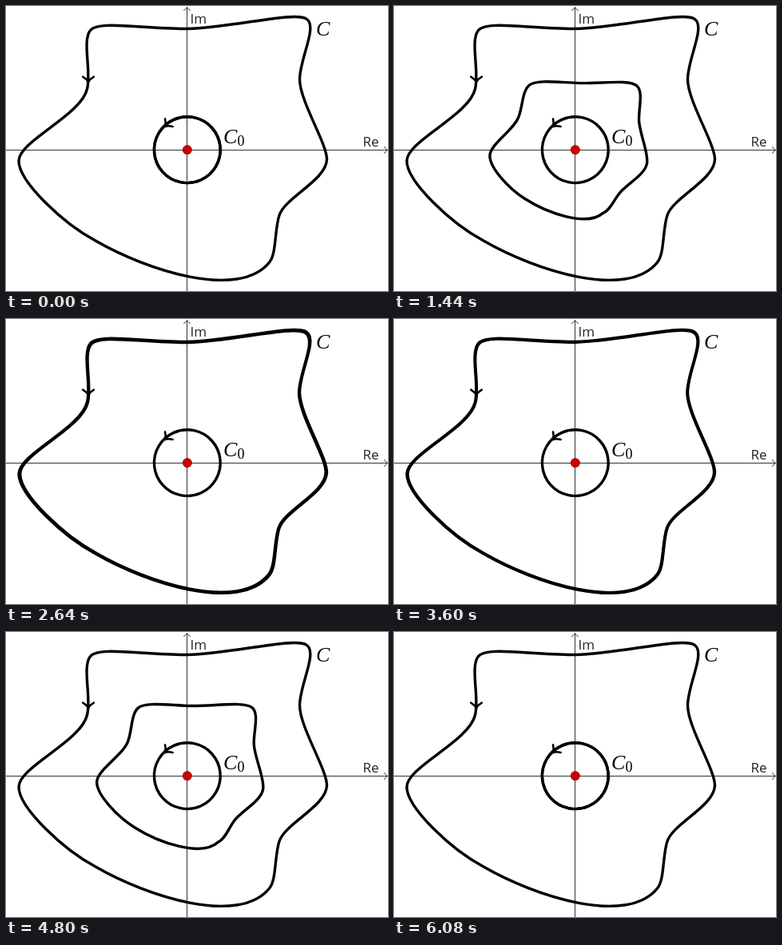
An HTML page with a canvas for the animation above (6240 ms loop, 478 px wide and 357 px high).

```html
<!DOCTYPE html>
<html lang="en">
<head>
<meta charset="utf-8">
<title>Contour deformation</title>
<style>
  html, body { margin: 0; width: 478px; height: 357px; overflow: hidden; background: #fff; }
  canvas { display: block; }
</style>
</head>
<body>
<canvas id="stage" width="478" height="357"></canvas>
<script>
const ctx = document.getElementById('stage').getContext('2d');
const W = 478, H = 357, LOOP = 6240, STEP = 80, LAG = 0.3;
const CX = 226.8, CY = 180.2, R = 41.4;

// Closed contour, counter-clockwise: anchor, then two handles towards the next anchor.
const outer = [
  [376.5, 16.5, 362, 5.8, 285, 27],
  [227, 28.5, 170, 29, 116, 17.5],
  [105.5, 30.5, 95, 43.5, 107, 82],
  [101.5, 104, 94, 137, 16, 169],
  [16, 194, 16, 220, 71, 272],
  [112, 294, 176, 331, 292, 369],
  [330, 320.5, 338.5, 309.5, 336, 280],
  [342, 262, 349.5, 239.5, 401, 218],
  [401.5, 192, 401.5, 172, 367.5, 119],
  [367.5, 92, 367.5, 66, 390, 26.5]
];

// The circle, cut into as many arcs as the contour has segments.
const rad = Math.PI / 180;
const arc = 360 / outer.length * rad;
const handle = 4 / 3 * Math.tan(arc / 4) * R;
const circle = outer.map((_, i) => {
  const a = 42 * rad + i * arc, b = a + arc;
  return [
    CX + R * Math.cos(a), CY - R * Math.sin(a),
    CX + R * Math.cos(a) - handle * Math.sin(a), CY - R * Math.sin(a) - handle * Math.cos(a),
    CX + R * Math.cos(b) + handle * Math.sin(b), CY - R * Math.sin(b) + handle * Math.cos(b)
  ];
});

const ease = u => (1 - Math.cos(Math.PI * u)) / 2;

function contour(f) {
  const segs = circle.map((s, i) => s.map((v, k) => v + (outer[i][k] - v) * f));
  ctx.beginPath();
  ctx.moveTo(segs[0][0], segs[0][1]);
  segs.forEach((s, i) => {
    const next = segs[(i + 1) % segs.length];
    ctx.bezierCurveTo(s[2], s[3], s[4], s[5], next[0], next[1]);
  });
  ctx.closePath();
  ctx.stroke();
}

function pen(color, width) {
  ctx.strokeStyle = color;
  ctx.lineWidth = width;
}

function line(...p) {
  ctx.beginPath();
  for (let i = 0; i < p.length; i += 2) ctx.lineTo(p[i], p[i + 1]);
  ctx.stroke();
}

// Curved arrow head with its tip at x, y; turn 0 points down.
function arrow(x, y, turn, size) {
  ctx.save();
  ctx.translate(x, y);
  ctx.rotate(turn);
  ctx.beginPath();
  ctx.moveTo(-size, -size);
  ctx.quadraticCurveTo(-size * 0.3, -size * 0.6, 0, 0);
  ctx.quadraticCurveTo(size * 0.3, -size * 0.6, size, -size);
  ctx.stroke();
  ctx.restore();
}

function text(str, x, y, font, color) {
  ctx.font = font;
  ctx.fillStyle = color;
  ctx.fillText(str, x, y);
}

function axes() {
  pen('#333', 1);
  line(0, 180.5, 477, 180.5);
  line(226.5, 2, 226.5, H);
  arrow(477.5, 180.5, -Math.PI / 2, 4);
  arrow(226.5, 1.5, Math.PI, 4);
}

function labels() {
  const sans = '17px "Open Sans", "Noto Sans", sans-serif';
  const serif = '"Liberation Serif", "Times New Roman", serif';
  text('Im', 230.5, 22, sans, '#222');
  text('Re', 446.5, 176, sans, '#222');
  text('C', 388, 37, 'italic 26px ' + serif, '#000');
  text('C', 272, 172, 'italic 26px ' + serif, '#000');
  text('0', 289.5, 175, '18px ' + serif, '#000');
}

function draw(t) {
  const step = Math.floor((t % LOOP) / STEP) - LAG;
  const f = ease(ease(2 * step * STEP / LOOP));

  ctx.fillStyle = '#fff';
  ctx.fillRect(0, 0, W, H);
  ctx.lineCap = ctx.lineJoin = 'round';
  axes();
  labels();

  pen('#000', 3.4);
  contour(1);
  contour(0);
  contour(f);
  pen('#000', 2.6);
  arrow(103, 95.5, 0, 6.8);
  arrow(199, 151, Math.PI / 4, 6.8);

  ctx.fillStyle = '#c00';
  ctx.beginPath();
  ctx.arc(CX, CY, 5.6, 0, 2 * Math.PI);
  ctx.fill();
  pen('#900', 0.8);
  ctx.stroke();
}

const start = performance.now();
function tick() {
  draw(performance.now() - start);
  requestAnimationFrame(tick);
}
tick();
</script>
</body>
</html>
```
